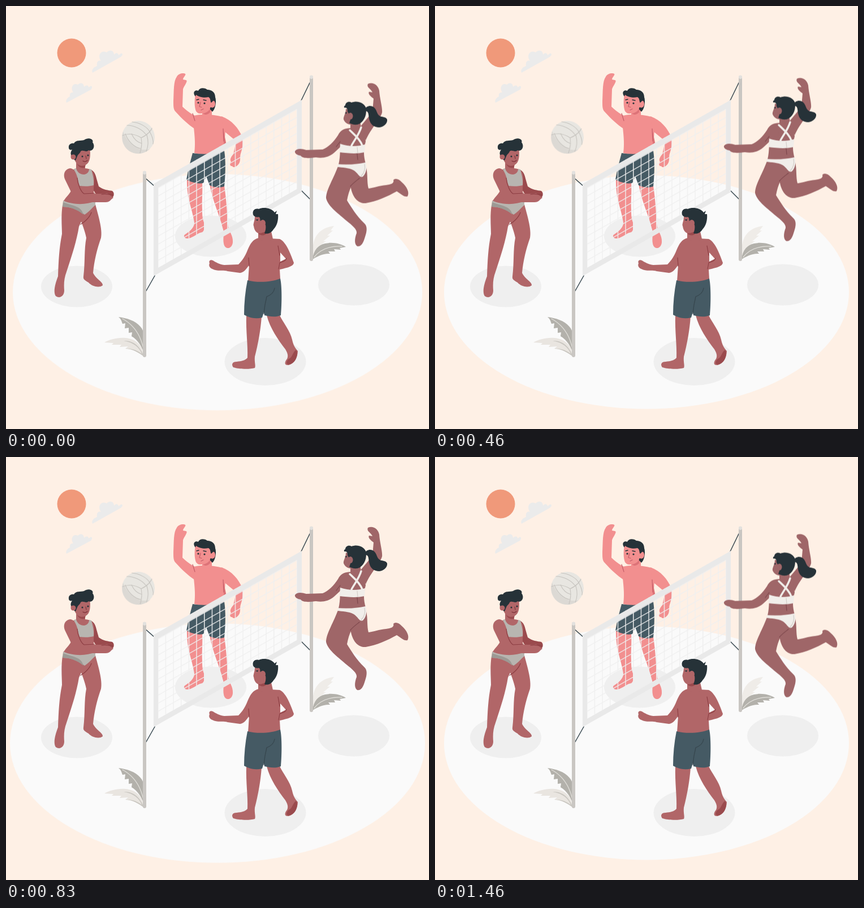
These frames come from a looping animation (748x748 px, 1.5 s). An HTML page:

```html
<!DOCTYPE html>
<html lang="en">
<head>
<meta charset="utf-8">
<title>Beach volleyball</title>
<style>
html, body { margin: 0; width: 100%; height: 100%; overflow: hidden; background: #fef0e5; }
svg { display: block; width: 100vw; height: 100vh; }
.sand, .ball { transform-box: fill-box; transform-origin: center; }
.sand { animation: beat 1.5s linear -16ms infinite; }
.jump { animation: float 1.5s linear -16ms infinite; }
.ball { animation: sway 1.5s linear -16ms infinite; }
@keyframes beat {
  0%, 30%, 39.4%, 58.9%, 100% { transform: scale(1); }
  10%, 49.2% { transform: scale(1.1); }
}
@keyframes float { 50% { transform: translateY(-15px); } }
@keyframes sway {
  25% { transform: rotate(3deg); }
  75% { transform: rotate(-3deg); }
}
.pink { fill: #f28f8f; }
.brown { fill: #b16668; }
.rose { fill: #9f6668; }
.deep { fill: #9a4a4d; }
.hair { fill: #263238; }
.short { fill: #455a64; }
.line { fill: none; stroke-linecap: round; stroke-linejoin: round; }
</style>
</head>
<body>
<svg viewBox="0 0 748 748">
  <defs>
    <pattern id="mesh" width="13.67" height="14.2" patternUnits="userSpaceOnUse" x="6" y="11">
      <path d="M0 .7H13.67M.7 0V14.2" stroke="#efefef" stroke-width="1.400"/>
    </pattern>
  </defs>
  <rect width="748" height="748" fill="#fef0e5"/>
  <ellipse class="sand" cx="374" cy="506" rx="358" ry="206.5" fill="#fafafa"/>

  <g fill="#efefef">
    <ellipse cx="362" cy="407" rx="63" ry="36.5"/>
    <ellipse cx="125" cy="496" rx="63" ry="36.5"/>
    <ellipse cx="615" cy="493" rx="63" ry="36.5"/>
    <ellipse cx="458.500" cy="629" rx="72" ry="42"/>
  </g>

  <circle cx="116" cy="83" r="25.500" fill="#f0997a"/>
  <g fill="#ebebeb">
    <path d="M153 118C151 114 153 109 161 106C160 99 163 95 168 97C161 87 168 77 178 82C184 76 191 79 191 86C195 81 199 84 199 87L203 84C208 83 206 88 203 90Z"/>
    <path d="M107 171C105 168 107 163 113 160C112 155 115 152 119 153C113 144 119 135 127 139C132 134 138 137 138 143C142 139 146 140 146 144L149 142C153 140 153 145 150 148Z"/>
  </g>

  <!-- plants -->
  <path fill="#e9e5e0" d="M244 619C242 600 229 588 211 587C196 586 183 590 174 595L190 596L187 599L204 599L201 603L216 602L211 606C224 606 235 613 244 619Z"/>
  <path fill="#c9c6c0" d="M244 620C238 602 225 591 208 592C226 595 236 604 240 615C232 609 222 605 211 606C224 606 236 614 244 620Z"/>
  <path fill="#b3b1ab" d="M245 617C247 597 246 580 240 570C231 557 215 552 199 550C203 553 204 556 206 562L211 561L210 570L217 569L217 578L223 577L222 584C233 590 241 603 245 617Z"/>
  <path class="line" stroke="#e0ded9" stroke-width="1.300" d="M206 553C228 565 240 585 244 612"/>
  <path fill="#efece8" d="M542 448C541 428 543 411 553 401C561 393 571 390 580 389L574 397L578 397L568 406L573 406L561 416L566 416C554 423 546 435 542 448Z"/>
  <path fill="#b3b1ab" d="M542 448C544 431 552 423 564 420C577 417 592 420 601 426L590 428L592 431L580 430L582 434L570 434L573 438C561 437 550 443 542 448Z"/>
  <path class="line" stroke="#e0ded9" stroke-width="1.300" d="M545 444C556 430 574 424 594 425"/>

  <!-- far player -->
  <g class="pink">
    <path d="M302 125C305 119 314 118 317 120C319 122 313 126 313 130L318 131C323 132 315 141 313 147L312 178C319 185 326 190 334 194L335 218C322 210 310 198 300 187C296 183 296 178 296 168C297 150 296 133 302 125Z"/>
    <path d="M332 194C349 190 367 192 383 196L389 208L385 258C368 264 345 263 333 260C336 240 332 217 331 205Z"/>
    <path d="M381 195C400 202 411 216 418 232C420 243 418 252 415 261C413 266 416 274 411 280C406 286 401 286 400 283C396 284 395 279 398 275C395 273 398 266 402 262L407 239L384 220Z"/>
    <path d="M320 306L347 312C348 332 346 345 347 360C347 368 347 374 349 380C352 388 352 396 347 400C339 401 332 409 323 411C315 412 312 406 318 403C327 397 333 391 333 383C330 360 319 340 320 306Z"/>
    <path d="M360 315L386 318C390 345 391 365 392 385C394 400 402 405 401 418C400 430 387 432 385 420C383 410 387 401 383 392C378 370 365 345 360 315Z"/>
    <path d="M346 178L364 176L364 194C360 200 351 199 347 193Z"/>
  </g>
  <path fill="#dd7378" d="M348 190C354 189 358 186 361 182L361 188C356 193 352 193 348 190ZM385 222L385 248L390 246Z"/>
  <path class="hair" d="M357 152C366 153 371 160 371 168C371 176 369 183 365 187L361 183Z"/>
  <path class="pink" d="M335 155C333 168 333 178 336 186C341 194 353 190 362 179C368 182 372 175 369 169C367 166 364 168 362 171L361 153Z"/>
  <path class="line" stroke="#c45e68" stroke-width="1.200" d="M384 217L385 239M330 190L334 203M345 184L349 182M344 170L342 178L346 179"/>
  <g class="hair">
    <path d="M335 160C329 153 334 147 340 150C343 143 353 145 356 148C364 148 370 153 370 161C371 166 370 169 367 167L363 171C361 168 362 163 358 161C351 163 341 161 336 157Z"/>
    <circle cx="340" cy="171" r="1.600"/><circle cx="351" cy="172" r="1.600"/>
    <path class="line" stroke="#263238" stroke-width="1.300" d="M337 166L341 165M349 166L354 167"/>
  </g>
  <path class="short" d="M330 260C348 263 370 262 386 256C389 275 388 300 386 319C378 322 368 321 360 317L354 301L349 313C340 315 328 312 319 307C322 290 326 275 330 260Z"/>

  <!-- net -->
  <g class="line" stroke="#37474f" stroke-width="1.500">
    <path d="M246 304L263 319M246 507L263 477M522 167L539 132M522 326L539 343"/>
  </g>
  <g transform="matrix(1 -.567 0 1 262 314)">
    <rect width="259" height="162" fill="url(#mesh)"/>
    <path fill="#e9e9e9" fill-rule="evenodd" d="M-1 0H261V163H-1ZM7 11V153H253V11Z"/>
  </g>
  <g class="line" stroke="#c9c6c2" stroke-width="6">
    <path d="M245 295V618M540 126V448"/>
    <path stroke="#e3e1de" d="M245 294.500V295M540 125.500V126"/>
  </g>

  <!-- ball -->
  <g class="ball">
    <circle cx="234" cy="232" r="29" fill="#e8e6e1"/>
    <path fill="#dcd9d4" d="M207 222C201 242 213 259 231 261C240 262 249 258 254 253C236 258 217 247 207 222Z"/>
    <g class="line" stroke="#c6c3be" stroke-width="1.100">
      <path d="M239 233C228 226 216 225 206 229M239 233C251 228 257 219 258 216M239 233C241 244 239 254 237 260"/>
      <path d="M214 211C227 211 241 218 248 228M223 205C236 206 250 214 254 222M211 226C216 240 227 250 238 252M222 226C226 235 232 241 240 243M249 228C252 238 252 248 248 257M254 222C259 231 261 239 260 244"/>
    </g>
  </g>

  <!-- receiving player -->
  <path class="deep" d="M144 288C155 289 158 296 160 305L164 319C172 325 181 326 188 327C193 331 191 339 184 342L160 334L148 316Z"/>
  <g class="brown">
    <path d="M100 352C97 372 99 390 99 403C94 428 93 450 92 478C87 491 83 506 88 513C95 518 103 513 103 503C102 490 103 481 107 470C117 440 125 415 129 390L139 368L158 348Z"/>
    <path d="M157 347C163 370 171 395 168 410C161 430 156 450 154 472C159 483 172 488 171 494C165 499 152 496 146 489C140 485 136 484 137 478C140 455 138 430 142 410C139 395 134 385 132 378L138 358Z"/>
    <path d="M124 275L140 277L140 287C151 288 156 293 156 304C156 318 153 326 158 348C148 362 112 360 101 346C107 336 116 330 118 319L106 296C112 289 124 290 124 286Z"/>
    <path d="M117 257C113 263 114 271 121 271C124 281 133 284 141 281C149 277 150 264 148 251C140 246 125 250 117 257Z"/>
  </g>
  <path class="deep" d="M126 279C131 284 137 283 141 281L139 286C133 287 128 285 126 279Z"/>
  <g fill="#b8b5b0">
    <path d="M120 288L124 287C126 294 131 298 138 298C144 297 147 293 147 288L151 289C153 298 156 306 155 317C145 320 130 319 122 316C122 306 124 300 120 288Z"/>
    <path d="M101 344C118 352 142 352 158 345L158 352C151 358 147 364 139 369C127 359 112 355 100 355Z"/>
  </g>
  <path fill="#9d9994" d="M101 347C119 354 133 353 137 369C125 359 112 355 100 355Z"/>
  <path class="brown" d="M113 287C103 289 101 298 104 306L119 337C123 346 132 347 145 347L176 347C184 347 185 342 190 339L179 331L166 332L138 332C132 326 128 313 126 302C123 292 119 287 113 287Z"/>
  <path class="line" stroke="#8d3e43" stroke-width="1.200" d="M126 304C127 317 133 329 138 332L157 331M169 333C177 331 183 334 189 334M132 386C138 383 148 374 151 365"/>
  <g class="hair">
    <path d="M111 251C110 245 115 242 120 243C124 236 132 239 138 237C146 231 156 236 153 241C159 248 153 259 146 255C142 260 136 253 132 257C131 261 127 262 126 266L123 273C118 272 119 265 116 264C113 261 115 257 117 254C114 255 111 254 111 251Z"/>
    <circle cx="135" cy="266" r="1.500"/><circle cx="145" cy="264" r="1.500"/>
  </g>
  <circle class="brown" cx="119" cy="267" r="4.500"/>
  <path class="line" stroke="#7d3339" stroke-width="1.200" d="M136 274C139 276 142 275 144 273M141 265L142 270"/>

  <!-- near player -->
  <g class="brown">
    <path d="M425 547L452 549C450 575 446 596 440 620C439 630 442 636 440 640C430 643 412 642 402 639C398 634 400 629 408 629C416 628 423 627 427 622C428 600 424 575 425 547Z"/>
    <path d="M461 547L484 547C490 560 503 575 506 590C508 600 512 606 516 610C516 620 510 632 500 635C492 636 492 630 497 624C500 618 497 612 494 607C481 590 467 570 461 547Z"/>
    <path d="M447 410C436 413 432 420 427 432C423 442 418 450 411 457L386 458C377 457 371 453 366 450C361 448 358 451 360 455C358 459 360 463 365 465C374 470 383 466 392 469L414 472C422 471 426 463 430 458L428 487C446 491 470 489 485 483L484 466C496 463 508 461 509 454C505 443 496 417 484 412Z"/>
    <path d="M446 396L468 394L472 412C464 418 453 417 446 411Z"/>
    <path d="M440 368C441 379 436 386 438 389C439 397 443 402 450 403C460 401 464 392 463 382L452 364Z"/>
  </g>
  <path fill="#fafafa" d="M485 436L495 447L485 452Z"/>
  <path class="deep" d="M513 608C517 613 515 628 504 633C494 636 495 629 500 624C507 621 506 613 513 608ZM446 402C454 402 459 399 462 395L460 403C455 407 450 406 446 402Z"/>
  <path class="line" stroke="#8d3e43" stroke-width="1.200" d="M481 424L484 441M496 446C495 451 489 452 484 454L482 465M429 445L430 460"/>
  <path class="hair" d="M437 369C435 362 440 357 447 359C455 355 469 357 475 365L479 362L477 368L481 368C482 379 479 389 473 395C469 401 464 404 457 402C459 397 460 392 459 387L451 382C448 379 451 375 447 373C443 374 439 373 437 369Z"/>
  <ellipse class="brown" cx="454" cy="384" rx="5" ry="6"/>
  <path class="hair" d="M441 378L446 377L445 380Z"/>
  <path class="short" d="M427 485C446 490 470 488 485 482C488 495 488 525 486 547C476 551 466 549 457 547L456 541L453 551C440 554 430 551 421 546C421 525 423 505 427 485Z"/>
  <path class="line" stroke="#37474f" stroke-width="1.300" d="M456 544C457 532 459 522 461 514C469 511 474 505 475 499"/>

  <!-- jumping player -->
  <g class="jump">
    <g class="rose">
      <path d="M640 138C648 134 658 139 660 150C661 165 666 180 665 189C661 202 645 217 636 238L627 213L648 188L650 164C643 159 640 155 642 152L648 153C645 146 637 145 640 138Z"/>
      <path d="M609 316C611 335 620 350 636 349C655 346 675 337 691 328C698 332 704 339 710 337C714 330 709 320 700 312C695 306 688 304 685 308C687 314 680 316 672 317C660 318 650 322 641 323C638 312 640 298 637 286L615 286Z"/>
      <path d="M588 281C580 305 566 325 566 340C569 355 590 369 602 380C612 388 621 395 620 402C616 412 616 422 621 425C630 427 633 415 636 405C639 395 638 388 633 384C620 372 610 355 603 344C605 334 607 326 611 319C618 313 626 306 630 298L636 279Z"/>
      <path d="M609 217C618 216 624 213 632 212L636 240C632 255 632 265 636 279L588 281C592 265 590 249 592 240Z"/>
      <path d="M612 216C599 216 592 219 587 229C580 240 570 250 560 254L531 255C522 252 514 252 511 257C510 261 515 264 521 265C525 271 540 269 548 268C560 270 570 268 580 260L607 235Z"/>
      <path d="M609 200L626 202L628 216L609 218Z"/>
      <path d="M601 182C601 191 596 196 597 201C600 208 607 212 615 209L623 190Z"/>
    </g>
    <path class="line" stroke="#7d474c" stroke-width="1.200" d="M620 252L622 272M609 319C614 313 620 309 625 305M584 249L591 240"/>
    <g class="hair">
      <path d="M600 176C600 171 606 168 611 171C621 167 632 171 636 179C639 191 634 203 626 208C620 212 612 210 607 207C609 203 610 199 608 194L604 187C604 183 603 180 600 180C597 181 597 177 600 176Z"/>
      <path d="M634 183C637 177 645 175 650 179C656 183 655 191 661 195C666 197 672 196 674 201C675 208 668 214 660 215C651 215 645 210 643 203C640 195 643 187 636 186Z"/>
    </g>
    <ellipse class="rose" cx="609" cy="195" rx="4.500" ry="6"/>
    <path class="hair" d="M599 189L603 188L602 191Z"/>
    <g fill="#f1eeea">
      <path d="M591 244C606 249 622 249 635 245L634 259C621 262 606 261 590 259Z"/>
      <path d="M587 280C604 282 622 280 636 277C639 285 637 297 631 302C625 305 623 296 615 291C606 286 594 286 586 285Z"/>
    </g>
    <path class="line" stroke="#f1eeea" stroke-width="3.500" d="M608 220C614 226 626 235 630 247M628 215C624 228 617 236 611 247"/>
    <path class="line" stroke="#d3cdc8" stroke-width="1.200" d="M621 250L622 260M634 280C636 289 633 296 628 301"/>
  </g>
</svg>
</body>
</html>
```
